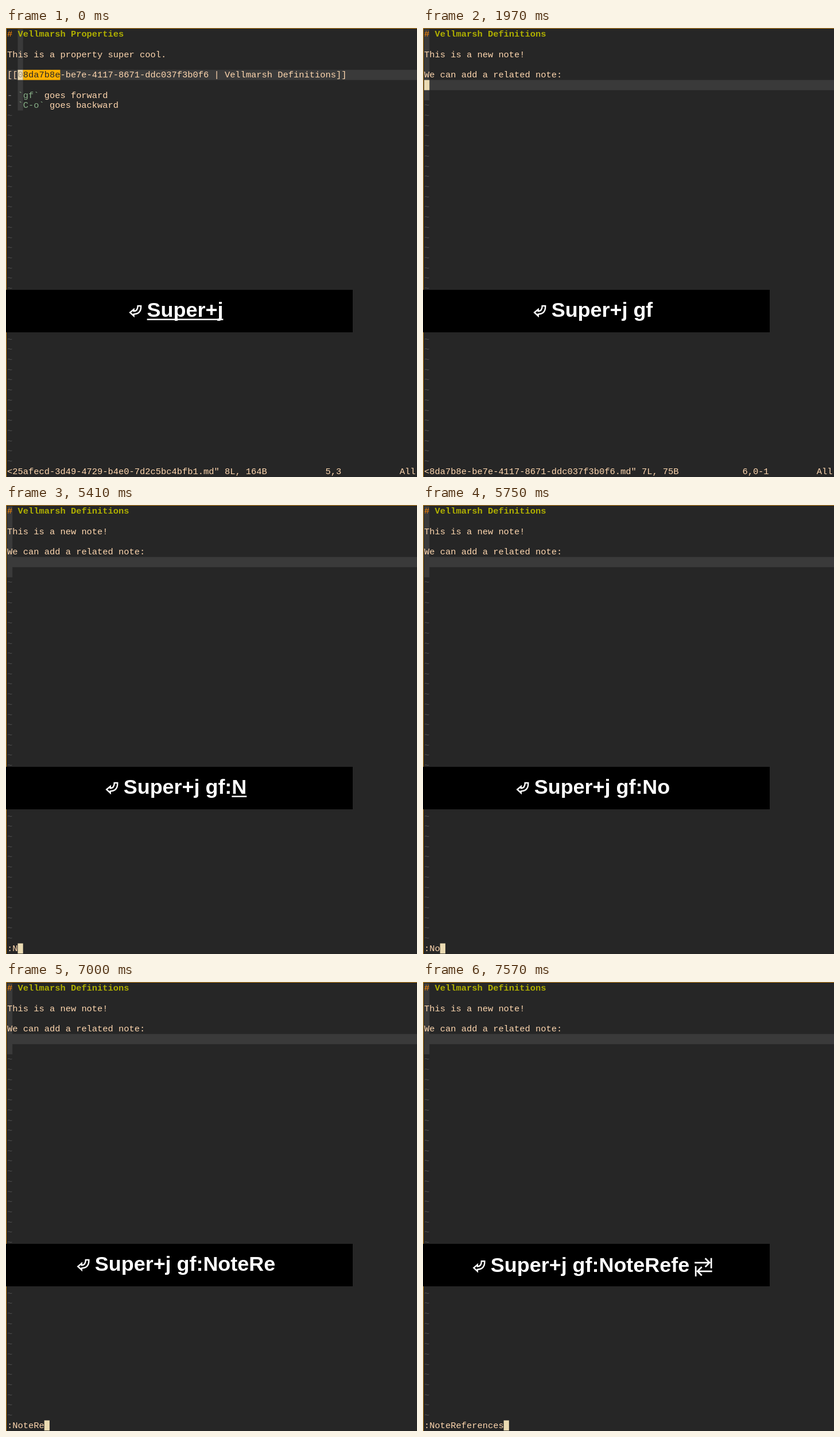
Animation of 716 by 782 pixels, one loop 8 s. Source, as an HTML page with a canvas:

```html
<!DOCTYPE html>
<html lang="en">
<head>
<meta charset="utf-8">
<title>Note editor</title>
<style>
  html, body { margin: 0; width: 716px; height: 782px; overflow: hidden; background: #262626; }
  canvas { display: block; }
</style>
</head>
<body>
<canvas id="stage" width="716" height="782"></canvas>
<script>
const ctx = document.getElementById("stage").getContext("2d");
const LOOP = 8000, SCALE = 0.77, CELL_W = 12, CELL_H = 23, LAST_ROW = 43;
const FG = "#ffd7af", BG = "#262626", LINE = "#3a3a3a", CURSOR = "#ebdbb2";
const ORANGE = "#ff8700", TITLE = "#afaf00", MATCH = "#ffaf00";
const CODE = "#87af87", MARKER = "#8a8a8a", TILDE = "#4e4e4e";

// time, keys on the banner, underlined trailing keys, tab key, bottom line
const STEPS = [
  [0, "Super+j", 7, false, ""],
  [110, "Super+j", 0, false, ""],
  [1720, "Super+j g", 1, false, "g"],
  [1830, "Super+j gf", 1, false, "open"],
  [1970, "Super+j gf", 0, false, "open"],
  [3140, "Super+j gf:", 1, false, ":"],
  [3280, "Super+j gf:", 0, false, ":"],
  [5410, "Super+j gf:N", 1, false, ":N"],
  [5610, "Super+j gf:No", 1, false, ":No"],
  [5750, "Super+j gf:No", 0, false, ":No"],
  [5930, "Super+j gf:Not", 1, false, ":Not"],
  [5970, "Super+j gf:Note", 1, false, ":Note"],
  [6110, "Super+j gf:Note", 0, false, ":Note"],
  [6650, "Super+j gf:NoteR", 1, false, ":NoteR"],
  [6800, "Super+j gf:NoteR", 0, false, ":NoteR"],
  [6850, "Super+j gf:NoteRe", 1, false, ":NoteRe"],
  [7000, "Super+j gf:NoteRe", 0, false, ":NoteRe"],
  [7050, "Super+j gf:NoteRef", 1, false, ":NoteRef"],
  [7140, "Super+j gf:NoteRefe", 1, false, ":NoteRefe"],
  [7280, "Super+j gf:NoteRefe", 0, false, ":NoteRefe"],
  [7430, "Super+j gf:NoteRefe", 1, true, ":NoteReferences"],
  [7570, "Super+j gf:NoteRefe", 0, true, ":NoteReferences"],
];

function cells(col, row, cols, rows, color) {
  ctx.fillStyle = color;
  ctx.fillRect(col * CELL_W, row * CELL_H, cols * CELL_W, rows * CELL_H);
}

function write(text, col, row, color = FG, weight = "") {
  ctx.font = `${weight} 20px "Liberation Mono", monospace`;
  ctx.fillStyle = color;
  ctx.fillText(text, col * CELL_W, row * CELL_H + 17.3);
}

function page(title, lines, column, line) {
  cells(column, 0, 1, lines, LINE);
  cells(0, line, 80, 1, LINE);
  write("#", 0, 0, ORANGE);
  write(title, 2, 0, TITLE, "bold");
  for (let row = lines; row < LAST_ROW; row++) write("~", 0, row, TILDE);
}

function status(message, position) {
  write(message, 0, LAST_ROW);
  write(position, 60, LAST_ROW);
  write("All", 74, LAST_ROW);
}

function propertiesPage(pending) {
  page("Vellmarsh Properties", 8, 2, 4);
  write("This is a property super cool.", 0, 2);
  cells(2, 4, 1, 1, CURSOR);
  cells(3, 4, 7, 1, MATCH);
  write("[[", 0, 4);
  write("0", 2, 4, "#a89984");
  write("8da7b8e", 3, 4, BG);
  write("-be7e-4117-8671-ddc037f3b0f6 | Vellmarsh Definitions]]", 10, 4);
  [["`gf`", "goes forward"], ["`C-o`", "goes backward"]].forEach(([key, text], i) => {
    write("-", 0, 6 + i, MARKER);
    write(key, 2, 6 + i, CODE);
    write(text, 3 + key.length, 6 + i);
  });
  status('<25afecd-3d49-4729-b4e0-7d2c5bc4bfb1.md" 8L, 164B', "5,3");
  write(pending, 50, LAST_ROW);
}

function definitionsPage(command) {
  page("Vellmarsh Definitions", 7, 0, 5);
  write("This is a new note!", 0, 2);
  write("We can add a related note:", 0, 4);
  if (command === "open") {
    cells(0, 5, 1, 1, CURSOR);
    status('<8da7b8e-be7e-4117-8671-ddc037f3b0f6.md" 7L, 75B', "6,0-1");
  } else {
    write(command, 0, LAST_ROW);
    cells(command.length, LAST_ROW, 1, 1, CURSOR);
  }
}

function icon(path, x, y, width) {
  ctx.save();
  ctx.translate(x, y);
  ctx.strokeStyle = "#fff";
  ctx.lineWidth = width;
  ctx.stroke(new Path2D(path));
  ctx.restore();
}

const RETURN_ICON = "M1.5 -7.5 L8 -13 V-9.8 Q15 -10 15 -19 H20.5 Q21 -5 8 -4.6 V-1.5 Z";
const TAB_ICON = "M2 -16.5 H28 M20.5 -24 L28 -16.5 L20.5 -9 M31 -24.5 V-6.5"
  + " M32.5 -1.5 H7 M14.5 -9 L7 -1.5 L14.5 6 M4 -10.5 V7.5";

function banner(keys, underlined, tab) {
  ctx.fillStyle = "#000";
  ctx.fillRect(0, 456, 604, 74);
  ctx.font = 'bold 35.93px "Liberation Sans", Arial, sans-serif';
  ctx.fontKerning = "none";
  ctx.fillStyle = "#fff";
  const width = ctx.measureText(keys).width;
  const left = 312 - (width + (tab ? 42 : 0)) / 2;
  const right = left + width;
  const base = tab ? 505.3 : 503;
  ctx.fillText(keys, left, base);
  if (underlined) {
    const lineWidth = tab ? 35 : ctx.measureText(keys.slice(-underlined)).width;
    ctx.fillRect(tab ? right + 7 : right - lineWidth, base + 3.4, lineWidth, 2.4);
  }
  icon(RETURN_ICON, left - 31, base, 2.4);
  if (tab) icon(TAB_ICON, right + 7, base, 2.7);
}

function draw(now) {
  const time = now % LOOP;
  const [start, keys, underlined, tab, command] = STEPS.findLast(step => step[0] <= time);
  ctx.fillStyle = BG;
  ctx.fillRect(0, 0, 716, 782);
  ctx.save();
  ctx.translate(2, 2);
  ctx.scale(SCALE, SCALE);
  if (start < 1830) propertiesPage(command);
  else definitionsPage(command);
  ctx.restore();
  ctx.fillStyle = "#c4861c";
  ctx.fillRect(0, 0, 716, 1);
  ctx.fillRect(0, 0, 1, 782);
  banner(keys, underlined, tab);
  requestAnimationFrame(() => draw(performance.now() - origin));
}

const origin = performance.now();
draw(0);
</script>
</body>
</html>
```
